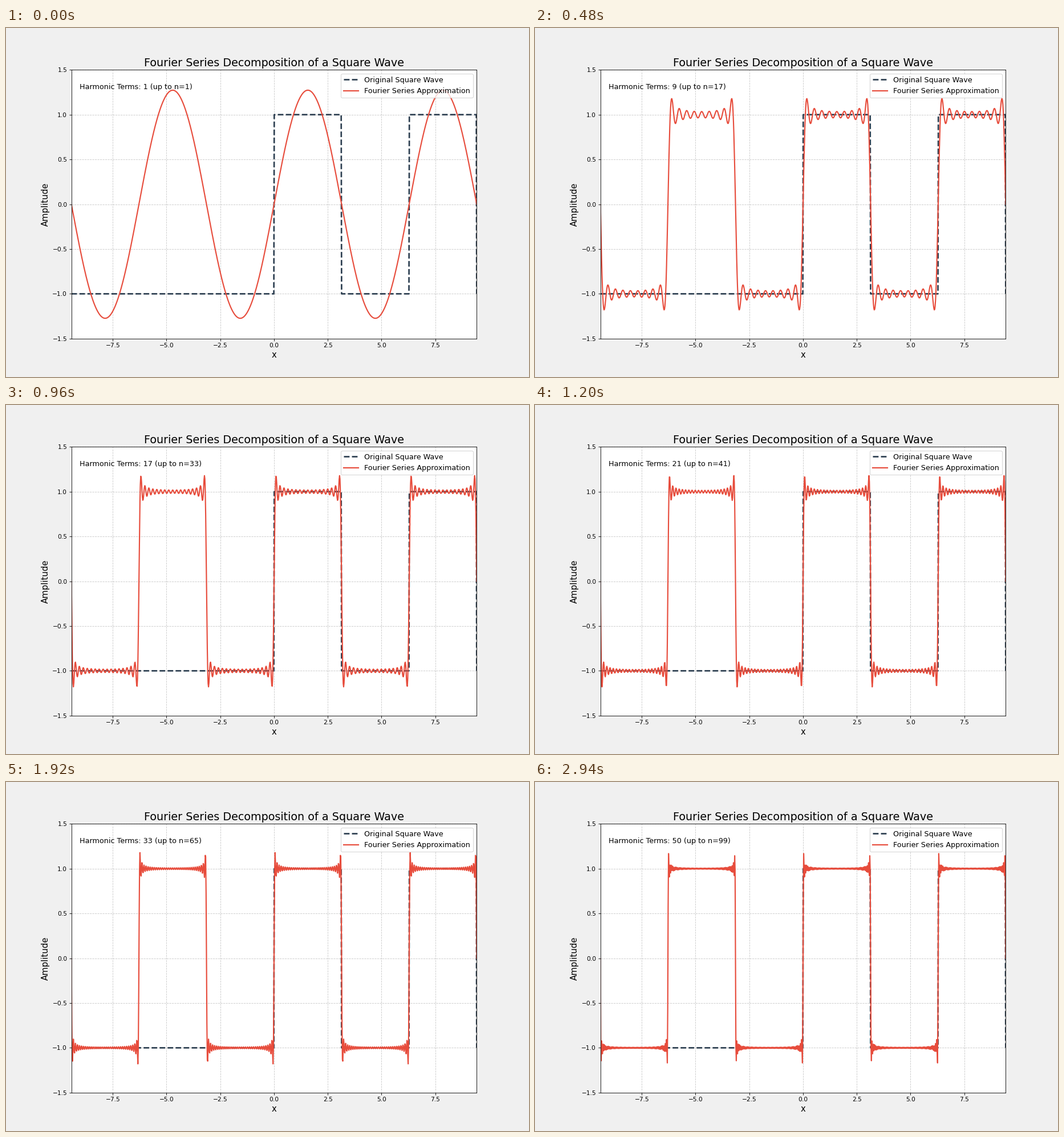
These frames come from a looping animation (917x611 px, 3 s). A matplotlib script:

```python
import numpy as np
import matplotlib.pyplot as plt
from matplotlib.animation import FuncAnimation

WIDTH, HEIGHT, DPI = 917, 611, 76.4
TERMS = 50
INTERVAL = 60

plt.rcParams["font.family"] = "DejaVu Sans"

x = np.linspace(-3 * np.pi, 3 * np.pi, 1000)


def square_wave(x):
    # fmod keeps the sign, so the wave stays low for negative x
    phase = np.fmod(x, 2 * np.pi)
    return np.where((phase > 0) & (phase < np.pi - 1e-9), 1.0, -1.0)


def partial_sum(x, terms):
    n = 2 * np.arange(terms)[:, None] + 1
    return 4 / np.pi * np.sum(np.sin(n * x) / n, axis=0)


# The small margin guards against rounding down by a pixel
fig, ax = plt.subplots(
    figsize=((WIDTH + 0.01) / DPI, (HEIGHT + 0.01) / DPI), dpi=DPI
)
fig.set_facecolor("#f0f0f0")

ax.plot(x, square_wave(x), "--", color="#2c3e50", lw=2.5,
        label="Original Square Wave")
curve, = ax.plot([], [], color="#e74c3c", lw=2,
                 label="Fourier Series Approximation")
caption = ax.text(0.02, 0.95, "", transform=ax.transAxes,
                  fontsize=12, va="top")

ax.set_xlim(-3 * np.pi, 3 * np.pi)
ax.set_ylim(-1.5, 1.5)
ax.set_title("Fourier Series Decomposition of a Square Wave", fontsize=18)
ax.set_xlabel("x", fontsize=14)
ax.set_ylabel("Amplitude", fontsize=14)
ax.grid(True, linestyle="--", alpha=0.7)
ax.legend(loc="upper right", fontsize=12)


def update(i):
    terms = i + 1
    curve.set_data(x, partial_sum(x, terms))
    caption.set_text(f"Harmonic Terms: {terms} (up to n={2 * terms - 1})")
    return curve, caption


anim = FuncAnimation(fig, update, frames=TERMS, interval=INTERVAL,
                     repeat=True, repeat_delay=0, blit=False)
plt.show()
```
